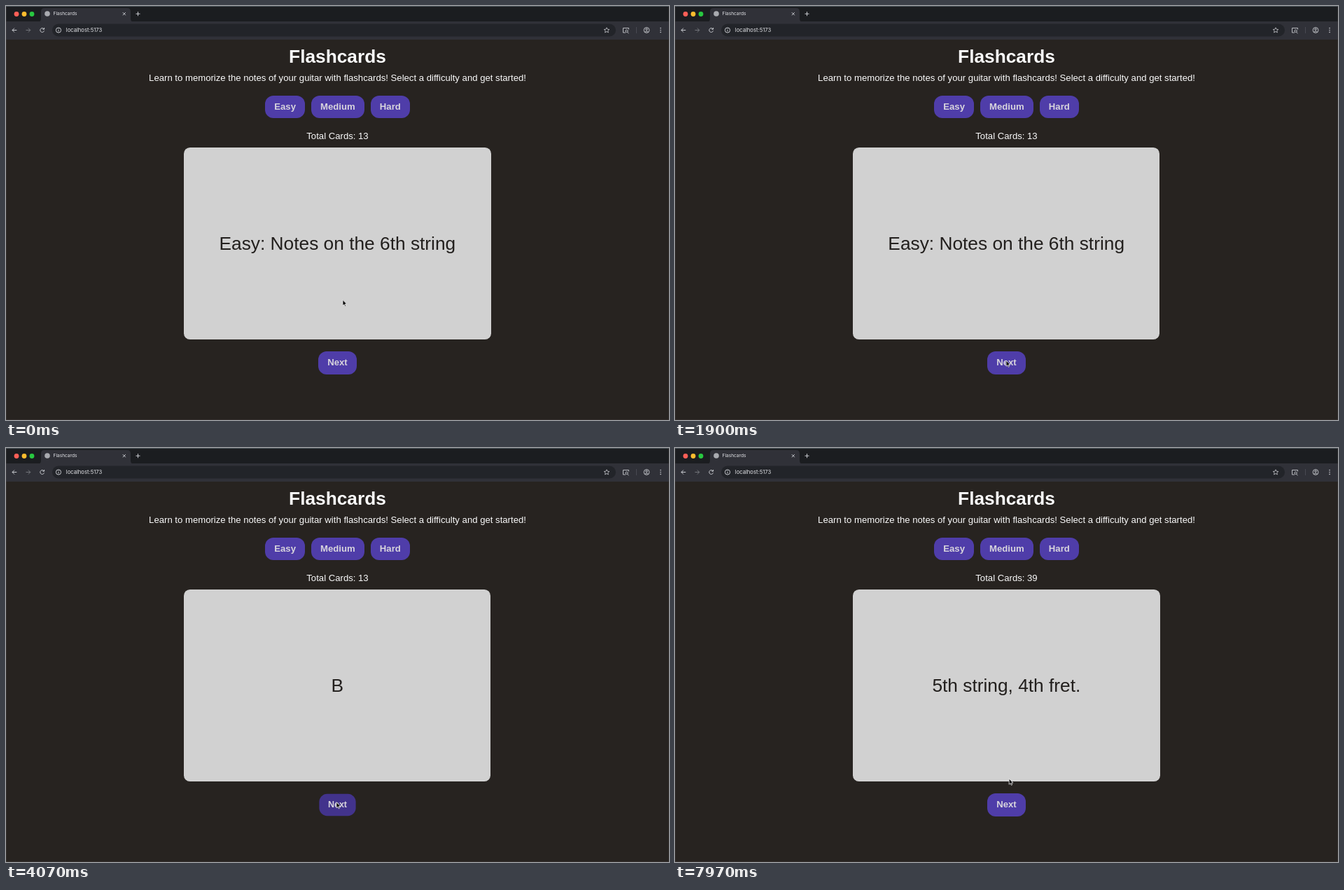
Recreate the animation shown at these times as an HTML page. Size 947x591 px, loop 8 s.

```html
<!DOCTYPE html>
<html lang="en">
<head>
<meta charset="utf-8">
<title>Flashcards</title>
<style>
  html, body { margin: 0; width: 100%; height: 100%; overflow: hidden; background: #272320; }
  #stage { position: relative; width: 947px; height: 591px; overflow: hidden;
    font: 13.15px Arial, "Liberation Sans", sans-serif; color: #fafafa; }
  svg { position: absolute; left: 0; top: 0; }
  svg text { font-family: Inter, sans-serif; fill: #e3e4e8; }
  .line { position: absolute; left: 0; width: 947px; line-height: 30px; text-align: center; white-space: nowrap; }
  h1 { margin: 0; font-size: 26.3px; }
  .btn { position: absolute; height: 32.6px; line-height: 32.6px; border-radius: 12px;
    background: #4f3da9; color: #d8d5dd; font-weight: bold; text-align: center; }
  #scene { position: absolute; left: 254.2px; top: 202px; width: 438.4px; height: 274px; perspective: 548px; }
  #card { width: 100%; height: 100%; transform-style: preserve-3d; }
  .face { position: absolute; inset: 0; box-sizing: border-box; padding: 0 11px; border-radius: 8.8px;
    display: flex; align-items: center; justify-content: center; text-align: center;
    background: #d1d1d1; color: #221f1d; font-size: 26.3px; backface-visibility: hidden; }
  #back { transform: rotateX(180deg); }
</style>
</head>
<body>
<div id="stage">
  <svg width="947" height="591">
    <rect width="947" height="23" fill="#1b1d20"/>
    <path d="M0 .5H947" stroke="#4a5359"/>
    <path d="M46 22.5Q50 22.5 50 18V8Q50 3 55 3H173Q178 3 178 8V18Q178 22.5 182 22.5Z" fill="#303138"/>
    <rect y="22" width="947" height="26" fill="#303138"/>
    <rect x="66" y="25.5" width="805" height="18" rx="9" fill="#222429"/>
    <circle cx="15" cy="11.5" r="3.4" fill="#ff5f57"/>
    <circle cx="26" cy="11.5" r="3.4" fill="#febc2e"/>
    <circle cx="37" cy="11.5" r="3.4" fill="#28c840"/>
    <circle cx="59" cy="11" r="3.8" fill="#a9abb0"/>
    <text x="67.5" y="13.4" font-size="6.58">Flashcards</text>
    <text x="85.8" y="37.2" font-size="7.67">localhost:5173</text>
    <g fill="none" stroke="#c9cbd0">
      <path d="M166.8 9.2l4 4m0-4l-4 4M185.5 11.2h6m-3-3v6M15.3 34.5H9m3-3l-3 3 3 3"/>
      <path d="M28.5 34.5h6.3m-3-3l3 3-3 3" stroke="#73757b"/>
      <path d="M54.2 33a2.9 2.9 0 1 0 .3 2.4M54.6 31v2.2h-2.2"/>
      <circle cx="75" cy="34.5" r="3.6"/>
      <path d="M75 34v2.4M75 32.3v.9"/>
      <path d="M858 30.8l1.1 2.4 2.7.3-2 1.8.6 2.6-2.4-1.4-2.4 1.4.6-2.6-2-1.8 2.7-.3Z" stroke-width=".8"/>
      <path d="M885 38h-3.5v-6.5h8v2M887.5 37.4l2 1.6" stroke-width=".9"/>
      <circle cx="886.6" cy="35.7" r="1.7" stroke-width=".9"/>
      <path d="M900.5 30v9" stroke="#484a52"/>
      <circle cx="915" cy="34.5" r="3.9" stroke-width=".9"/>
      <circle cx="915" cy="33.4" r="1.3" stroke-width=".9"/>
      <path d="M912.4 37.2q2.6-2 5.2 0" stroke-width=".9"/>
    </g>
    <g fill="#c9cbd0">
      <circle cx="935" cy="31.6" r=".8"/><circle cx="935" cy="34.5" r=".8"/><circle cx="935" cy="37.4" r=".8"/>
    </g>
    <path d="M.25 0V591M946.75 0V591M0 590.75H947" stroke="#4b4544" stroke-width=".5"/>
  </svg>

  <h1 class="line" style="top:57px">Flashcards</h1>
  <div class="line" style="top:88px">Learn to memorize the notes of your guitar with flashcards! Select a difficulty and get started!</div>
  <div class="btn" style="left:370px;top:127.8px;width:57.3px">Easy</div>
  <div class="btn" id="medium" style="left:435.8px;top:127.8px;width:76.2px">Medium</div>
  <div class="btn" style="left:520.6px;top:127.8px;width:56.5px">Hard</div>
  <div class="line" style="top:170.5px">Total Cards: <span id="total"></span></div>
  <div id="scene"><div id="card">
    <div class="face" id="front"></div>
    <div class="face" id="back"></div>
  </div></div>
  <div class="btn" id="next" style="left:446px;top:493.3px;width:55px">Next</div>

  <svg width="947" height="591">
    <path id="cursor" d="M0 0V8.3L1.9 6.6 3.2 9.4 4.5 8.8 3.3 6.1H5.8Z"
      fill="#080808" stroke="#eee" stroke-width=".8"/>
  </svg>
</div>
<script>
const LOOP = 8000, FLIP = 400, PRESS = 100;
const $ = id => document.getElementById(id);
const clamp = x => Math.max(0, Math.min(1, x));
const easy = "Easy: Notes on the 6th string";
const medium = "Medium: Notes on the 4th, 5th, and 6th strings";

// time, front text, back text, card total, angle the card turns to
const steps = [
  [0, easy, easy, 13, 0],
  [1220, easy, easy, 13, 180],
  [2060, "6th string, 7th fret.", "B", 13, 0],
  [3260, "6th string, 7th fret.", "B", 13, 180],
  [4120, "6th string, 10th fret.", "D", 13, 0],
  [4921, "6th string, 10th fret.", "D", 13, 180],
  [6300, medium, medium, 39, 0],
  [7520, "5th string, 4th fret.", "C#", 39, 0]
];

// time, x, y of the pointer tip
const path = [
  [0, 481, 419.5], [900, 481, 419.5], [1250, 481.5, 405], [1550, 481.5, 405],
  [1900, 473, 506], [2200, 473, 506], [2500, 474, 464], [2750, 491, 420],
  [3540, 491, 420], [3920, 472, 505.5], [4230, 472, 505.5], [4720, 495, 433.5],
  [5550, 495, 433.5], [6200, 477.5, 147], [6480, 477.5, 147],
  [7250, 473, 506], [7720, 473, 506], [8060, 478, 465]
];

const presses = { next: [2060, 4120, 7520], medium: [6300] };

// cubic-bezier(.25, .1, .25, 1)
function ease(x) {
  let lo = 0, hi = 1, s = .5;
  for (let i = 0; i < 24; i++) {
    s = (lo + hi) / 2;
    if (.75 * s * (1 - s) + s ** 3 < x) lo = s; else hi = s;
  }
  return .3 * s * (1 - s) ** 2 + 3 * s * s * (1 - s) + s ** 3;
}

function setText(id, text) {
  if ($(id).textContent !== String(text)) $(id).textContent = text;
}

function drawCard(t) {
  const i = steps.findLastIndex(s => s[0] <= t);
  const [start, front, back, total, angle] = steps[i];
  const from = i ? steps[i - 1][4] : angle;
  const turn = from + (angle - from) * ease(clamp((t - start) / FLIP));
  setText("front", front);
  setText("back", back);
  setText("total", total);
  $("card").style.transform = `rotateX(${turn}deg)`;
}

function drawCursor(t) {
  const i = path.findLastIndex(p => p[0] <= t);
  const [t0, x0, y0] = path[i], [t1, x1, y1] = path[i + 1];
  const u = (t - t0) / (t1 - t0), k = u * u * (3 - 2 * u);
  $("cursor").setAttribute("transform", `translate(${x0 + (x1 - x0) * k} ${y0 + (y1 - y0) * k})`);
}

function drawPress(id, t) {
  const amount = Math.max(...presses[id].map(c =>
    Math.min(clamp((t - c + PRESS) / 40), clamp((c + 40 - t) / 40))));
  const mix = (a, b) => a + (b - a) * amount;
  $(id).style.transform = `scale(${mix(1, .95)})`;
  $(id).style.background = `rgb(${mix(79, 66)},${mix(61, 51)},${mix(169, 140)})`;
}

function frame() {
  const t = performance.now() % LOOP;
  drawCard(t);
  drawCursor(t);
  Object.keys(presses).forEach(id => drawPress(id, t));
  requestAnimationFrame(frame);
}
frame();
</script>
</body>
</html>
```
